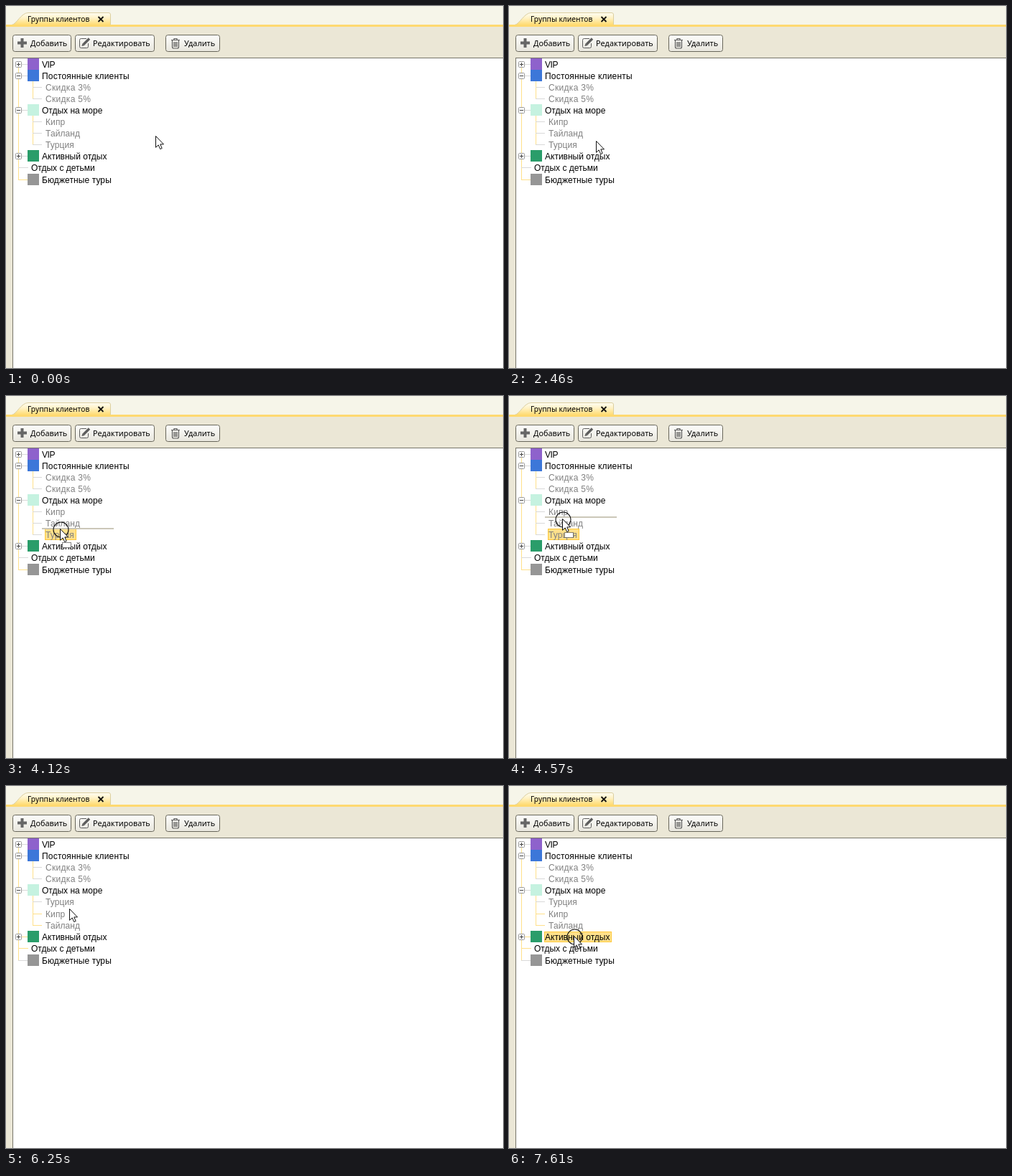
Recreate the animation shown at these times as an HTML page. Size 692 by 505 pixels, loop 8 s.

```html
<!DOCTYPE html>
<html lang="ru">
<head>
<meta charset="utf-8">
<style>
  html, body { margin: 0; width: 100%; height: 100%; overflow: hidden; background: #ebe7d6; }
  svg { display: block; }
  .ui { font-family: "Noto Sans", "Open Sans", sans-serif; font-size: 10.8px; }
  .tree { font-family: "Liberation Sans", Arial, sans-serif; font-size: 12px; }
</style>
</head>
<body>
<svg width="692" height="505" viewBox="0 0 692 505">
  <defs>
    <linearGradient id="tab" x2="0" y2="1">
      <stop offset="0" stop-color="#fffdf3"/>
      <stop offset=".45" stop-color="#fff1c2"/>
      <stop offset="1" stop-color="#ffdb70"/>
    </linearGradient>
    <linearGradient id="btn" x2="0" y2="1">
      <stop offset="0" stop-color="#fdfdfb"/>
      <stop offset="1" stop-color="#e8e6dd"/>
    </linearGradient>
  </defs>

  <rect width="692" height="505" fill="#ebe7d6"/>
  <rect width="692" height="27" fill="#f6f5e9"/>
  <path d="M8 26.500C15 25 21 9.500 31 9.500H143Q145.500 9.500 145.500 12V26.500Z" fill="url(#tab)" stroke="#dccf9f"/>
  <rect y="26" width="692" height="3" fill="#ffd970"/>
  <g class="ui">
    <text x="30" y="22" font-size="10.2">Группы клиентов</text>
    <path d="M128.500 15L135.500 22M135.500 15L128.500 22" stroke="#111" stroke-width="1.800"/>
    <g id="buttons"></g>
  </g>

  <g fill="none" stroke="#5c5c5c">
    <path d="M22.500 45V58M16 51.500H29" stroke="#666" stroke-width="4"/>
    <path d="M112 45.500H104.500Q102.500 45.500 102.500 47.500V56.500Q102.500 58.500 104.500 58.500H112.500Q114.500 58.500 114.500 56.500V52"/>
    <path d="M108 53.500L116 45.500" stroke-width="3.400"/>
    <path d="M105.500 56L106.600 52L109.500 55Z" fill="#5c5c5c" stroke="none"/>
    <path d="M230 47.500H242M234 47V45.500H238V47M231.500 48V57Q231.500 59 233.500 59H238.500Q240.500 59 240.500 57V48M234 50V57M236 50V57M238 50V57" stroke-width="1.200"/>
  </g>

  <rect x="9.500" y="72.500" width="700" height="450" fill="#fff" stroke="#77756a"/>
  <g id="before" class="tree"></g>
  <g id="after" class="tree"></g>
  <rect id="drop" x="50" width="100" height="2" fill="#cbc7b8"/>

  <g id="pointer">
    <circle id="press" cx="1.500" cy="1.500" r="10.500" fill="none" stroke="#111" stroke-width="1.100"/>
    <path d="M.5 .5V16.300L4.200 12.900L6.700 18.600L9.200 17.500L6.800 11.900H11.500Z" fill="#fff" stroke="#111"/>
    <rect id="parcel" x="3.500" y="19.500" width="12" height="7" fill="#fff" stroke="#111" stroke-dasharray="1 1"/>
  </g>
</svg>

<script>
const LOOP = 8000, GRAB = 3520, DRAG = 4120, RELEASE = 5300, REORDER = 5830, SELECT = 7460;
const GREY = '#d9d9d9', GOLD = '#ffe08a';
const $ = id => document.getElementById(id);
const show = (el, on) => el.setAttribute('visibility', on ? 'visible' : 'hidden');

const line = (d, color = GREY) => `<path d="${d}" stroke="${color}" fill="none"/>`;
const mark = (y, open) => `<rect x="13.5" y="${y - 3.5}" width="8" height="8" rx="1" fill="#fff" stroke="#999"/>` +
  line(`M15 ${y + .5}H20${open ? '' : `M17.5 ${y - 2}V${y + 3}`}`, '#444');
const glow = (id, x, y, w, h) =>
  `<rect id="${id}" x="${x + .5}" y="${y + .5}" width="${w}" height="${h}" fill="#ffe08a" stroke="#ffc93c"/>`;
const label = (x, y, text, color, gap = 0) =>
  `<text x="${x}" y="${y + 5}" fill="${color}" letter-spacing="${gap}">${text}</text>`;

function group(y, text, color, open, tick = GREY, gap) {
  const from = open === undefined ? 17 : 22;
  return line(`M${from} ${y + .5}H31`, tick) +
    (color ? `<rect x="30" y="${y - 8}" width="16" height="16" fill="${color}"/>` : '') +
    (open === undefined ? '' : mark(y, open)) +
    label(color ? 50 : 35, y, text, '#000', gap);
}
const child = (y, text, tick = GREY, gap = .1) =>
  line(`M37 ${y + .5}H50`, tick) + label(55, y, text, '#808080', gap);

function tree(ys, names, moved, hot) {
  const [a, b, c, active, kids, budget] = ys;
  const tick = moved ? GOLD : GREY;
  return line(`M17.5 86V${budget}M37.5 105V129M37.5 153V${c}`, GOLD) + hot +
    group(81, 'VIP', '#8e62cc', false, GREY, -.4) +
    group(97, 'Постоянные клиенты', '#3c77d9', true, GREY, .2) +
    child(113, 'Скидка 3%', GREY, .3) + child(129, 'Скидка 5%', GREY, .3) +
    group(145, 'Отдых на море', '#c5f2e0', true) +
    child(a, names[0]) + child(b, names[1], tick) + child(c, names[2], tick) +
    group(active, 'Активный отдых', '#2a9d6a', false, tick) +
    group(kids, 'Отдых с детьми', '', undefined, tick) +
    group(budget, 'Бюджетные туры', '#969696', undefined, moved ? GREY : GOLD, .1);
}

$('buttons').innerHTML = [[9, 81, 34, 'Добавить'], [96, 110, 121, 'Редактировать'], [222, 75, 248, 'Удалить']]
  .map(([x, w, tx, text]) =>
    `<rect x="${x + .5}" y="40.5" width="${w}" height="23" rx="3" fill="url(#btn)" stroke="#68665a"/>
     <text x="${tx}" y="56">${text}</text>`).join('');
$('before').innerHTML = tree([161, 177, 193, 209, 225, 242], ['Кипр', 'Тайланд', 'Турция'], false,
  glow('grabbed', 54, 185, 43, 15));
$('after').innerHTML = tree([161, 178, 194, 210, 226, 243], ['Турция', 'Кипр', 'Тайланд'], true,
  glow('picked', 49, 203, 93, 14));

// Pointer moves: first step, last step, number of steps, end point
const moves = [
  [780, 930, 2, 195, 182], [1860, 1860, 1, 195, 184], [2010, 2610, 5, 103, 189],
  [3070, 3370, 3, 82, 192], [3520, 3970, 4, 81, 191], [4120, 4120, 1, 75, 185],
  [4270, 4990, 6, 73, 157], [5830, 6250, 4, 88, 171], [6400, 6550, 2, 90, 182],
  [6860, 7310, 4, 90, 209]
];

function pointerAt(t) {
  let x = 208, y = 181;
  for (const [from, to, n, ex, ey] of moves) {
    if (t < from) break;
    const done = n === 1 ? 1 : Math.min(n, Math.floor((t - from) / ((to - from) / (n - 1)) + 1.001));
    x += (ex - x) * done / n;
    y += (ey - y) * done / n;
  }
  return [Math.round(x), Math.round(y)];
}

function draw(t) {
  const [x, y] = pointerAt(t);
  const between = (a, b) => t >= a && t < b;
  $('pointer').setAttribute('transform', `translate(${x} ${y})`);
  $('drop').setAttribute('y', 152 + 16 * Math.round((y - 157) / 16));
  show($('before'), t < REORDER);
  show($('after'), t >= REORDER);
  show($('grabbed'), between(GRAB, REORDER));
  show($('picked'), t >= SELECT);
  show($('drop'), between(DRAG, REORDER));
  show($('parcel'), between(DRAG, RELEASE));
  show($('press'), between(GRAB, RELEASE) || t >= SELECT);
}

// Hidden groups must also hide their highlight, so state is set on both
function tick() {
  draw(performance.now() % LOOP);
  requestAnimationFrame(tick);
}
tick();
</script>
</body>
</html>
```
